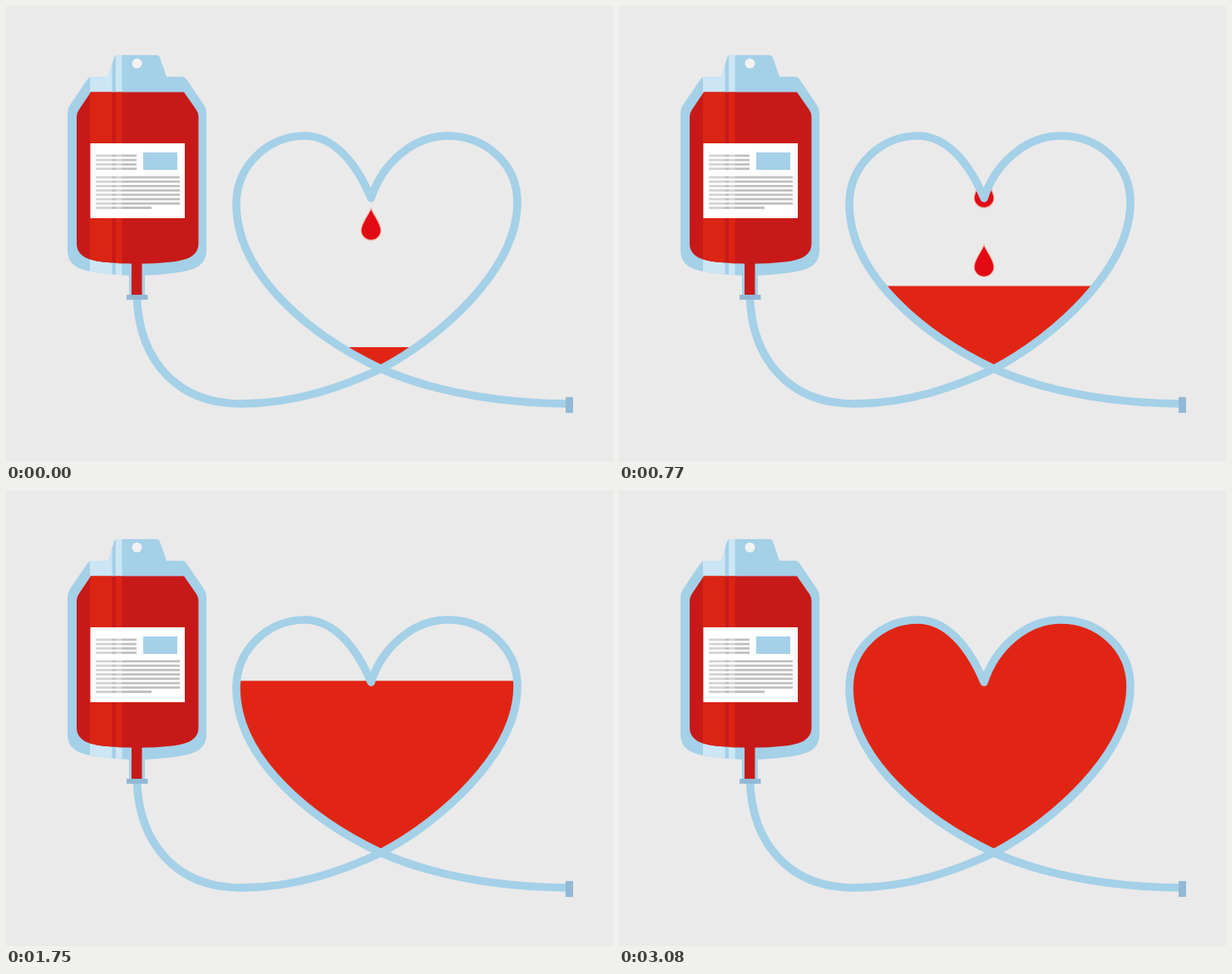
An HTML page for the animation above (3150 ms loop, 730 by 548 pixels).

```html
<!DOCTYPE html>
<html>
<head>
<meta charset="utf-8">
<style>
html, body { margin: 0; width: 100%; height: 100%; overflow: hidden; background: #eaeaea; }
svg { display: block; width: 730px; height: 548px; }
</style>
</head>
<body>
<svg viewBox="0 0 730 548">
  <defs>
    <path id="heart" d="M451 436C520 400 615 318 615 236C615 190 577 156 531 156C489 156 452 190 439 231C421 188 394 156 359 156C316 156 277 191 277 238C277 325 370 398 451 436Z"/>
    <path id="bag" d="M135 59H180Q184 59 185 62L193 85H212Q215 85 217 88L238 119Q241 123 241 128V293C241 311 229 317 205 320.500C172 325 143 325 110 320.500C86 317 74 311 74 293V128Q74 123 77 119L98 88Q100 85 103 85H123L130 62Q131 59 135 59Z"/>
    <path id="blood" d="M102 103.500H214L229 125Q231.500 129 231.500 133V285C231.500 300 219 305 200 307.500Q158 312 116 307.500C97 305 85 300 85 285V133Q85 129 87.500 125Z"/>
    <path id="drop" d="M0 0C3 8 12 18 12 26.500A12 12 0 0 1 -12 26.500C-12 18 -3 8 0 0Z" fill="#e20a13" stroke="#efb9ae" stroke-width="1.300"/>
    <clipPath id="inHeart"><use href="#heart"/></clipPath>
    <clipPath id="inBag"><use href="#bag"/></clipPath>
    <clipPath id="inBlood"><use href="#blood"/></clipPath>
    <path id="shine" d="M101 50H127.500V330H101ZM132 50H139.500V330H132Z"/>
  </defs>

  <g clip-path="url(#inHeart)">
    <g id="drops"></g>
    <rect id="liquid" x="260" width="370" height="300" fill="#e12514"/>
  </g>

  <g fill="none" stroke="#a4d0e8" stroke-width="9.600" stroke-linejoin="round">
    <path d="M157.500 350C160 425 205 478 283 478C350 478 408 456 451 436"/>
    <use href="#heart"/>
    <path d="M451 436C520 466 595 477 675 478"/>
  </g>
  <rect x="673" y="470" width="9" height="19" fill="#92b9d5"/>

  <rect x="148" y="312" width="19" height="37" fill="#a4d0e8"/>
  <use href="#bag" fill="#a4d0e8"/>
  <use href="#shine" fill="#cce6f5" clip-path="url(#inBag)"/>
  <use href="#blood" fill="#c71a18"/>
  <g clip-path="url(#inBlood)">
    <use href="#shine" fill="#da2414"/>
  </g>
  <rect x="151" y="304" width="12.500" height="44" fill="#c71a18"/>
  <rect x="145" y="347" width="25.500" height="6" fill="#92b9d5"/>
  <circle cx="157.500" cy="69" r="6" fill="#f2f2f2"/>

  <rect x="101.500" y="165" width="113.500" height="90" fill="#fff"/>
  <rect x="165" y="176" width="41" height="21" fill="#a4d0e8"/>
  <path id="print" fill="none" stroke="#bfbfbf" stroke-width="2.800"/>
  <path d="M101.500 166H127.500V254H101.500ZM132 166H139.500V254H132Z" fill="#fff" opacity=".3"/>
</svg>
<script>
const STEP = 70, STEPS = 45;
const PERIOD = 8, DROPS = 3;
const LEVELS = [[0, 410], [7, 362], [11, 336.5], [17, 294], [21, 268], [30, 181], [33, 150]];
const $ = id => document.getElementById(id);

const row = (y, end) => `M108 ${y}H${end}`;
const rows = (count, y, end) =>
  Array.from({ length: count }, (_, i) => row(y + i * 5.25, end)).join('');
$('print').setAttribute('d', rows(4, 179.8, 157) + rows(7, 205.8, 209) + row(242.5, 175));

const drops = Array.from({ length: DROPS }, () => {
  const drop = document.createElementNS('http://www.w3.org/2000/svg', 'use');
  drop.setAttribute('href', '#drop');
  return $('drops').appendChild(drop);
});

function levelAt(step) {
  const i = LEVELS.findIndex(([s]) => s > step);
  if (i < 0) return LEVELS[LEVELS.length - 1][1];
  const [s0, y0] = LEVELS[i - 1], [s1, y1] = LEVELS[i];
  return y0 + (y1 - y0) * (step - s0) / (s1 - s0);
}

// The drop eases out of the tube, hangs for a moment, then falls.
function dropY(n) {
  return n < 0 ? 241 - 37 * (-n / 4) ** 1.5 : 241 + 2 * n ** 2.26;
}

function draw(now) {
  const step = Math.floor(now / STEP) % STEPS;
  $('liquid').setAttribute('y', levelAt(step));
  drops.forEach((drop, i) => {
    const y = dropY(step + 1 - i * PERIOD);
    drop.setAttribute('transform', `translate(439 ${y})`);
  });
}

let start;
function tick(now) {
  start ??= now;
  draw(now - start);
  requestAnimationFrame(tick);
}
draw(0);
requestAnimationFrame(tick);
</script>
</body>
</html>
```
